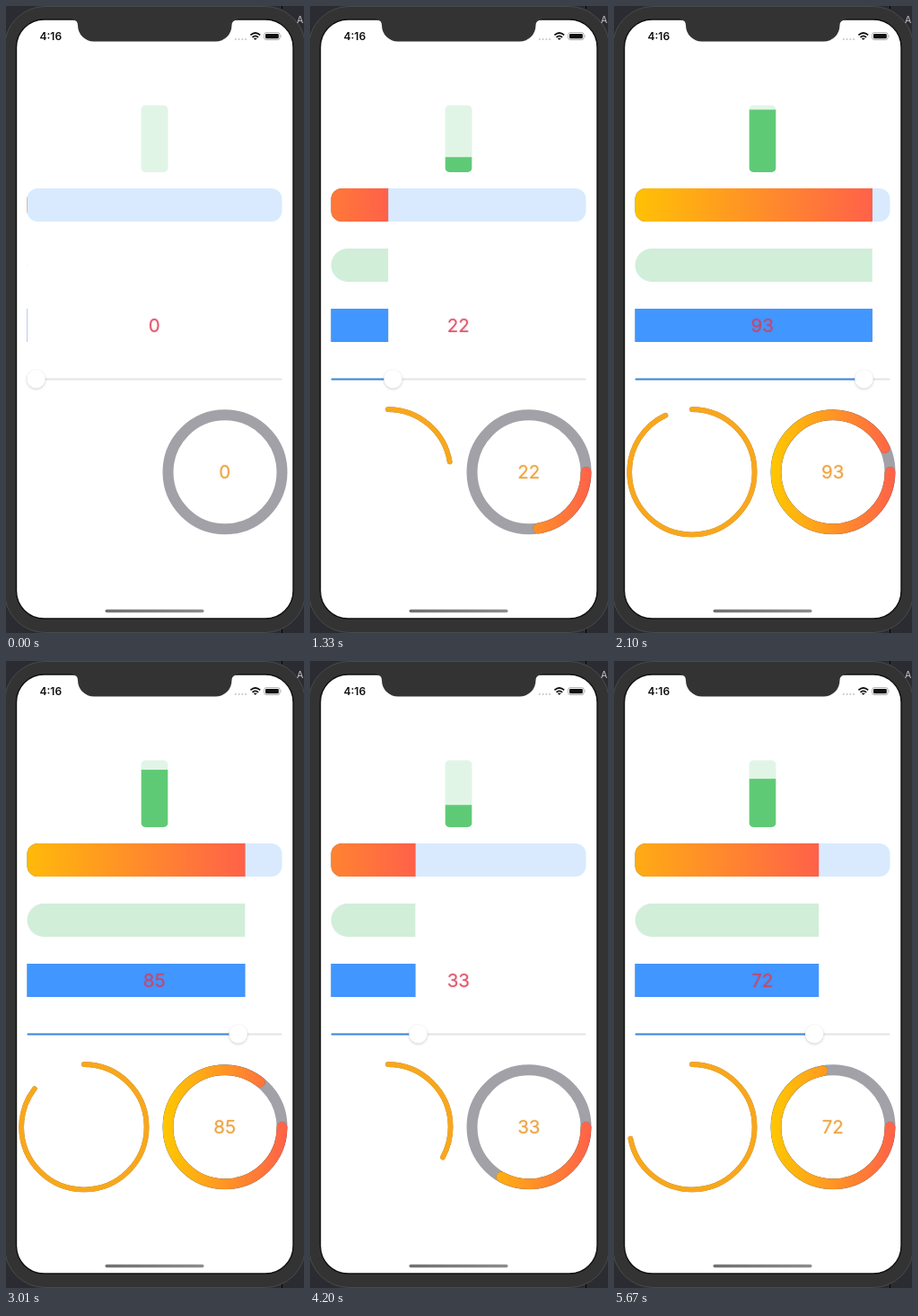
An HTML page that plays this animation: 332x698 px, repeating every 5.74 s.

```html
<!DOCTYPE html>
<html lang="en">
<head>
<meta charset="utf-8">
<title>Progress controls</title>
<style>
  html, body { margin: 0; width: 100%; height: 100%; overflow: hidden; background: #29292b; }
  svg { display: block; width: 100%; height: 100%; }
  text { font-family: Inter, Roboto, sans-serif; }
  .value { font-size: 20.5px; text-anchor: middle; }
  .soft { filter: drop-shadow(0 0 .7px rgba(40, 40, 50, .6)); }
  .knob { filter: drop-shadow(0 1.5px 1.5px rgba(0, 0, 0, .2)); }
  .ring { fill: none; stroke-linecap: round; }
</style>
</head>
<body>
<svg viewBox="0 0 332 698">
  <defs>
    <linearGradient id="warm">
      <stop offset="0" stop-color="#ffc800"/>
      <stop offset="1" stop-color="#ff6149"/>
    </linearGradient>
    <linearGradient id="warmRing" gradientUnits="userSpaceOnUse" x1="174.5" y1="0" x2="313.5" y2="0">
      <stop offset="0" stop-color="#ffc800"/>
      <stop offset="1" stop-color="#ff6149"/>
    </linearGradient>
    <linearGradient id="home">
      <stop offset="0" stop-color="#707070"/>
      <stop offset="1" stop-color="#8c8c8c"/>
    </linearGradient>
    <clipPath id="tank"><rect x="150.5" y="110.5" width="30" height="74.5" rx="5"/></clipPath>
    <clipPath id="bar"><rect x="23.5" y="203" width="284" height="37" rx="12"/></clipPath>
    <clipPath id="pill"><rect x="23.5" y="270" width="284" height="37" rx="18.5"/></clipPath>
    <clipPath id="block"><rect x="23.5" y="337" width="284" height="37"/></clipPath>
  </defs>

  <!-- phone -->
  <rect width="332" height="698" fill="#2b2c32"/>
  <path d="M307.5 0V3M307.5 693V698" stroke="#000"/>
  <rect x="-1.5" y=".5" width="335" height="697" rx="45" fill="#333334" stroke="#4a4a4c"/>
  <text x="324" y="19" font-size="10.5" fill="#c8c8ca">A</text>
  <rect x="11.5" y="15" width="308.5" height="667" rx="31" fill="#fff" stroke="#111" stroke-width="1.4"/>
  <path d="M74 14H258V15.5Q251.5 15.5 251.5 21.5A18 18 0 0 1 233.5 39.5H98A18 18 0 0 1 80 21.5Q80 15.5 74 15.5Z" fill="#333334"/>

  <!-- status bar -->
  <text x="37.5" y="38" font-size="12" font-weight="600" fill="#111">4:16</text>
  <g fill="#c9c9cb">
    <circle cx="255.8" cy="37" r="1.1"/><circle cx="259.6" cy="37" r="1.1"/>
    <circle cx="263.4" cy="37" r="1.1"/><circle cx="267.2" cy="37" r="1.1"/>
  </g>
  <g fill="none" stroke="#111" stroke-width="1.7">
    <path d="M272.4 32.4Q277.8 27.6 283.2 32.4M274.5 34.8Q277.8 31.8 281.1 34.8"/>
    <path d="M276.2 36L277.8 37.6L279.4 36Z" fill="#111" stroke-width=".6"/>
  </g>
  <rect x="287.7" y="29.6" width="17.4" height="8" rx="2.3" fill="none" stroke="#999" stroke-width=".8"/>
  <rect x="289" y="30.9" width="14.8" height="5.4" rx="1.2" fill="#111"/>
  <path d="M306.3 32.3Q307.7 33.6 306.3 34.9Z" fill="#999"/>
  <rect x="110.5" y="671.7" width="110" height="3.6" rx="1.8" fill="url(#home)"/>

  <!-- bars -->
  <rect x="150.5" y="110.5" width="30" height="74.5" rx="5" fill="#e1f5e6"/>
  <g clip-path="url(#tank)"><rect id="level" x="150.5" y="185" width="30" height="75" fill="#5fca76"/></g>
  <rect x="23.5" y="203" width="284" height="37" rx="12" fill="#d9eaff"/>
  <g class="soft"><g clip-path="url(#bar)"><rect class="slide" y="203" width="284" height="37" fill="url(#warm)"/></g></g>
  <g clip-path="url(#pill)"><rect class="slide" y="270" width="284" height="37" fill="#d1eed9"/></g>
  <g class="soft"><g clip-path="url(#block)"><rect class="slide" y="337" width="284" height="37" fill="#4196ff"/></g></g>
  <text class="value" x="165.3" y="363" fill="#d93a52" fill-opacity=".82" style="filter:drop-shadow(0 0 1px rgba(217,58,82,.45))">0</text>

  <!-- slider -->
  <rect x="23.5" y="414.4" width="284" height="2" rx="1" fill="#e4e4e6"/>
  <rect id="track" x="23.5" y="414.4" height="2" rx="1" fill="#3f86e0"/>
  <circle id="knob" class="knob" cy="415.3" r="10.2" fill="#fff"/>

  <!-- rings -->
  <g class="soft"><circle class="ring arc" cx="86.9" cy="518.8" r="69.7" pathLength="100" transform="rotate(-90 86.9 518.8)" stroke="#f9a71b" stroke-width="5.6"/></g>
  <circle class="ring" cx="244" cy="518.8" r="63.5" stroke="#a1a1a7" stroke-width="12"/>
  <g class="soft"><circle class="ring arc" cx="244" cy="518.8" r="63.5" pathLength="100" stroke="url(#warmRing)" stroke-width="11.6"/></g>
  <text class="value" x="243.8" y="526.3" fill="#eb9a2e" fill-opacity=".88" style="filter:drop-shadow(0 0 1px rgba(235,154,46,.45))">0</text>
</svg>
<script>
  const LOOP = 5740, STEP = 70, WIDTH = 284;
  // [ms, percent] of the slider drag
  const drag = [
    [700, 0], [1050, 9], [1330, 22.4], [1680, 55], [2100, 93.05], [2380, 100], [2660, 100],
    [3010, 85.5], [3220, 62], [3640, 25.4], [3850, 21], [4200, 33.05], [4480, 50], [4830, 67], [5110, 72.05]
  ];
  const all = s => document.querySelectorAll(s);
  const level = all('#level')[0], track = all('#track')[0], knob = all('#knob')[0];
  const slides = all('.slide'), arcs = all('.arc'), labels = all('.value');

  const slope = i => (drag[i + 1][1] - drag[i][1]) / (drag[i + 1][0] - drag[i][0]);

  // harmonic mean keeps the curve free of overshoot
  function tangent(i) {
    if (i === 0 || i === drag.length - 1) return 0;
    const a = slope(i - 1), b = slope(i);
    return a * b <= 0 ? 0 : 2 * a * b / (a + b);
  }

  function valueAt(t) {
    const last = drag.length - 1;
    if (t <= drag[0][0]) return 0;
    if (t >= drag[last][0]) return drag[last][1];
    const i = drag.findIndex(p => p[0] > t) - 1;
    const [t0, v0] = drag[i], [t1, v1] = drag[i + 1];
    const h = t1 - t0, u = (t - t0) / h, w = 1 - u;
    return v0 * (1 + 2 * u) * w * w + v1 * u * u * (3 - 2 * u)
      + h * u * w * (tangent(i) * w - tangent(i + 1) * u);
  }

  function draw(v) {
    const part = v / 100;
    level.setAttribute('y', 185 - 74.8 * part);
    slides.forEach(s => s.setAttribute('x', 23.5 + WIDTH * (part - 1)));
    track.setAttribute('width', 10 + 263 * part);
    knob.setAttribute('cx', 33.5 + 263.3 * part);
    arcs.forEach(a => {
      a.style.display = v > 0 ? '' : 'none';
      a.setAttribute('stroke-dasharray', `${v} 200`);
    });
    labels.forEach(l => l.textContent = Math.floor(v));
  }

  const start = performance.now();
  function tick() {
    const t = (performance.now() - start) % LOOP;
    draw(valueAt(Math.floor(t / STEP) * STEP));
    requestAnimationFrame(tick);
  }
  tick();
</script>
</body>
</html>
```
